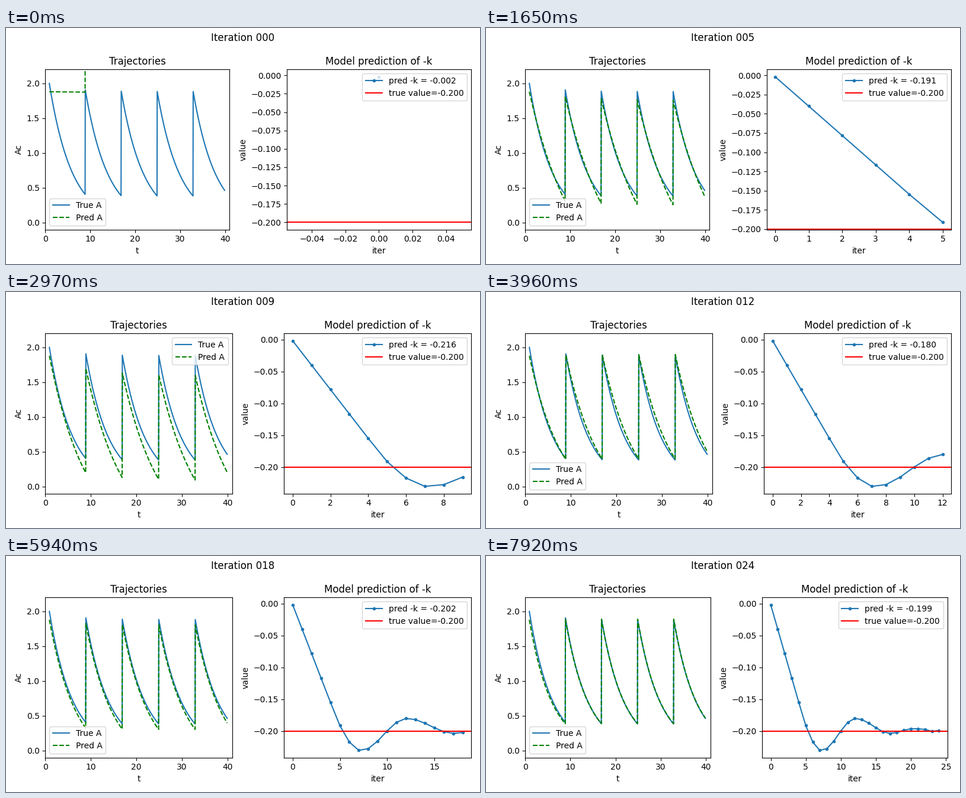
A matplotlib script that plays this animation: 800x400 px, repeating every 8 s.

```python
import math
import numpy as np
import matplotlib.pyplot as plt
from matplotlib.animation import FuncAnimation

LOOP, STEP, HOLD = 8000, 50, 330      # ms
LAST = LOOP // HOLD
TRUE_K, DOSE, PERIOD = 0.2, 1.5, 8
T_START, T_END = 0.9, 39.9

# Points where the estimate settles or turns while it rings down
TURNS = [(7.2, -.2306), (12.1, -.180), (17.1, -.2034), (20.3, -.196),
         (21.6, -.1966), (23.1, -.2003), (24, -.199)]


def estimate(n):
    """Value of -k: a steady descent, a braking curve, then ringing."""
    if n <= 4:
        return -0.0019 - 0.0382 * n
    low_n, low = TURNS[0]
    if n <= low_n:
        left = (low_n - n) / (low_n - 4)
        return low + (estimate(4) - low) * left ** 1.75
    for (n0, v0), (n1, v1) in zip(TURNS, TURNS[1:]):
        if n <= n1:
            ease = (1 - math.cos(math.pi * (n - n0) / (n1 - n0))) / 2
            return v0 + (v1 - v0) * ease


def trajectory(start, rate, drift=0.0):
    """Solve A' = -rate * A + drift, with a dose added every period."""
    level = drift / rate
    times, values = [], []
    t0, a0 = T_START, start
    while t0 < T_END:
        t1 = min(t0 + PERIOD, T_END)
        t = np.linspace(t0, t1 - 0.04 * (t1 < T_END), 90)
        a = level + (a0 - level) * np.exp(-rate * (t - t0))
        times.append(t)
        values.append(a)
        t0, a0 = t1, a[-1] + DOSE
    return np.concatenate(times), np.concatenate(values)


def predicted(n):
    # The rate is learned quickly at first, then slowly up to its true value
    rate = np.interp(n, [0, 5, LAST], [-0.0015, TRUE_K / 2, TRUE_K])
    bias = 0.0068 * math.tanh(n) * (1 - (n / LAST) ** 4)
    return trajectory(1.88, rate, estimate(n) + rate - bias)


def draw_paths(ax, n):
    ax.plot(*trajectory(2.0, TRUE_K), label="True A")
    ax.plot(*predicted(n), "g--", label="Pred A")
    ax.set(title="Trajectories", xlabel="t", ylabel="Ac",
           xlim=(0, 41), ylim=(-0.1, 2.2))
    overshoot = estimate(n) < -0.21
    ax.legend(loc="upper right" if overshoot else "lower left")


def draw_estimate(ax, n):
    history = [estimate(i) for i in range(n + 1)]
    ax.plot(history, ".-", label=f"pred -k = {history[-1]:.3f}")
    ax.axhline(-TRUE_K, color="r", label=f"true value={-TRUE_K:.3f}")
    ax.set(title="Model prediction of -k", xlabel="iter", ylabel="value")
    ax.legend(loc="upper right")


fig = plt.figure(figsize=(8, 4), dpi=100)


def update(frame):
    n = min((frame * STEP + STEP - 10) // HOLD, LAST)
    title = f"Iteration {n:03d}"
    if fig.get_suptitle() == title:
        return []
    fig.clear()
    left, right = fig.subplots(1, 2)
    draw_paths(left, n)
    draw_estimate(right, n)
    fig.suptitle(title)
    # The second pass lets the margins settle
    fig.tight_layout()
    fig.tight_layout()
    return []


anim = FuncAnimation(fig, update, frames=LOOP // STEP, interval=STEP,
                     init_func=lambda: update(0), repeat=True,
                     repeat_delay=0, blit=False)
plt.show()
```
